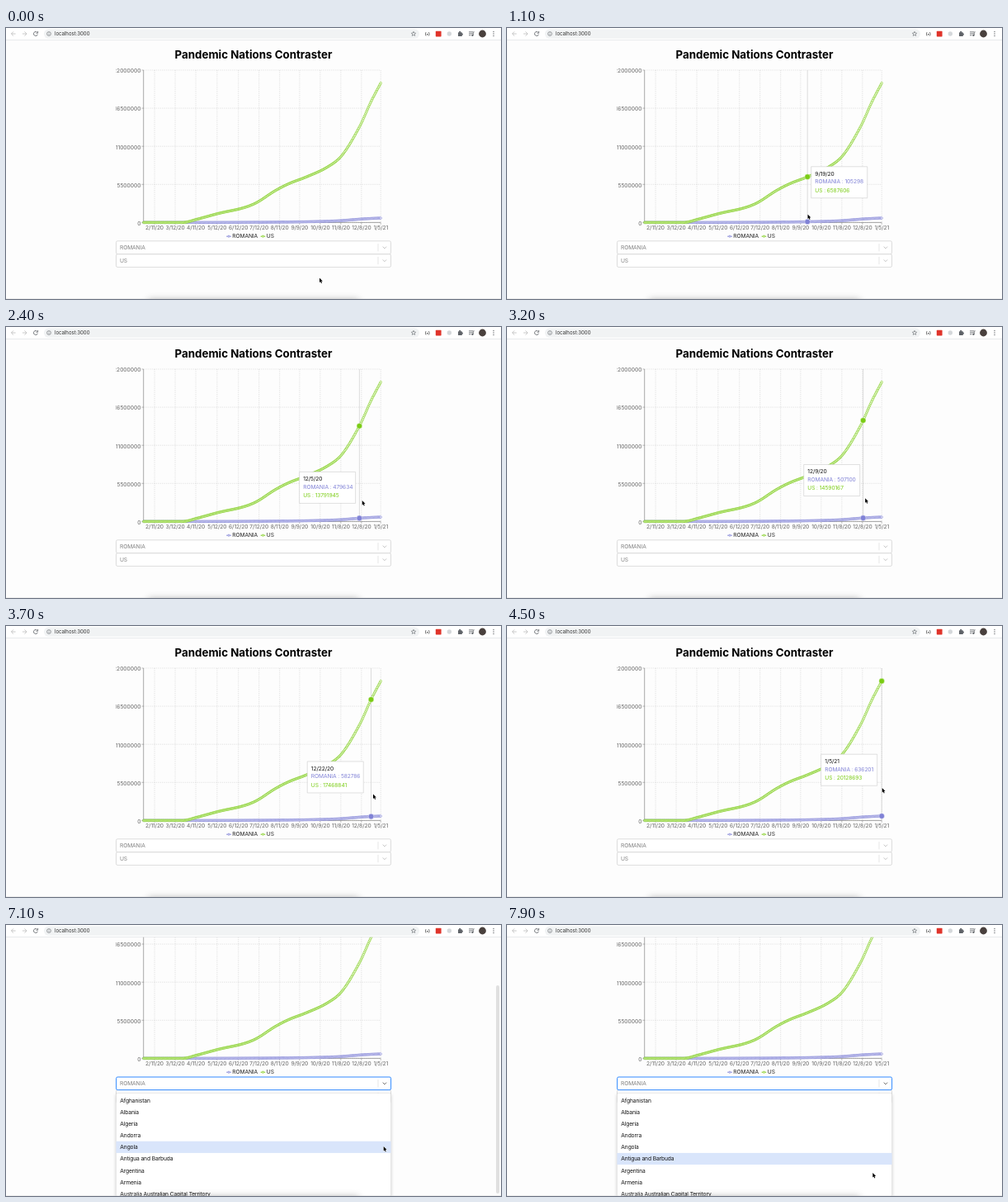
Animation, 600 px wide and 328 px high, one loop 8 s. Source, as an HTML page with a canvas:

```html
<!DOCTYPE html>
<html lang="en">
<head>
<meta charset="utf-8">
<title>Pandemic Nations Contraster</title>
<style>
html, body { margin: 0; width: 100%; height: 100%; overflow: hidden; background: #fdfdfd; }
canvas { display: block; width: 600px; height: 328px; }
</style>
</head>
<body>
<canvas id="stage"></canvas>
<script>
const W = 600, H = 328, LOOP = 8000, STEP = 100;
const U = 600 / 1440; // one page pixel on the stage
const FONT = 'Inter, "Liberation Sans", sans-serif';
const GREEN = '#7acc14', PURPLE = '#8082d6';
const canvas = document.getElementById('stage');
const ctx = canvas.getContext('2d');
const dpr = window.devicePixelRatio || 1;
canvas.width = W * dpr;
canvas.height = H * dpr;

const plot = { left: 166.7, right: 454.2, top: 51, bottom: 235.4 };
const DAYS = 345, MAX = 22e6, DAY_WIDTH = (plot.right - plot.left) / DAYS;
const dayX = day => plot.left + day * DAY_WIDTH;
const dayAt = x => Math.min(DAYS, Math.round((x - plot.left) / DAY_WIDTH));
const valueY = v => plot.bottom - v / MAX * (plot.bottom - plot.top);

// [day, total cases]
const US = [[0, 0], [58, 0], [79, 5e5], [110, 1.33e6], [145, 2.11e6], [165, 2.9e6], [191, 4.56e6],
  [212, 5.63e6], [237, 6587606], [267, 7.98e6], [289, 9.74e6], [314, 13791945], [331, 17468841], [345, 20128693]];
const ROMANIA = [[0, 0], [60, 0], [160, 27e3], [237, 105298], [283, 241e3], [314, 479634], [331, 582786], [345, 636201]];

const TICK_DAYS = [16, 46, 76, 107, 138, 168, 198, 227, 257, 287, 317, 345];
const OPTIONS = ['Afghanistan', 'Albania', 'Algeria', 'Andorra', 'Angola', 'Antigua and Barbuda',
  'Argentina', 'Armenia', 'Australia Australian Capital Territory'];

// time, pointer x, y
const POINTER = [[200, 380, 302.5], [600, 365, 212], [1000, 364, 207], [1100, 364.5, 225.5], [1900, 432, 217],
  [2200, 425, 219], [2400, 431.7, 210], [3100, 432, 208], [3700, 445, 203.5], [4200, 454.7, 196],
  [5400, 454.7, 196], [5600, 458, 228], [6000, 457.7, 268], [7700, 457.7, 268], [7900, 443.3, 300]];
const HOVER_START = 600, HOVER_END = 5500, CLICK = 6500;

function pointerAt(t) {
  const i = POINTER.findIndex(k => k[0] > t);
  if (i === 0) return POINTER[0].slice(1);
  if (i < 0) return POINTER[POINTER.length - 1].slice(1);
  const [t0, x0, y0] = POINTER[i - 1], [t1, x1, y1] = POINTER[i];
  const f = (t - t0) / (t1 - t0);
  return [x0 + (x1 - x0) * f, y0 + (y1 - y0) * f];
}

// Cubic curve through the data points
function casesAt(points, day) {
  const last = points.length - 1;
  let i = 0;
  while (i < last - 1 && points[i + 1][0] <= day) i++;
  const slope = n => {
    const a = points[Math.max(0, n - 1)], b = points[Math.min(last, n + 1)];
    return (b[1] - a[1]) / (b[0] - a[0]);
  };
  const [x0, y0] = points[i], [x1, y1] = points[i + 1];
  const w = x1 - x0, f = (day - x0) / w, g = 1 - f;
  const y = g * g * (1 + 2 * f) * y0 + f * f * (3 - 2 * f) * y1 + f * g * w * (g * slope(i) - f * slope(i + 1));
  return Math.max(0, Math.round(y));
}

function dateOf(day) {
  const d = new Date(Date.UTC(2020, 0, 26 + day));
  return `${d.getUTCMonth() + 1}/${d.getUTCDate()}/${d.getUTCFullYear() % 100}`;
}

function text(str, x, y, { size = 16 * U, color = '#666', align = 'left', weight = 400, spacing = -0.1 } = {}) {
  ctx.font = `${weight} ${size}px ${FONT}`;
  ctx.letterSpacing = spacing + 'px';
  ctx.fillStyle = color;
  ctx.textAlign = align;
  ctx.textBaseline = 'alphabetic';
  ctx.fillText(str, x, y + size * 0.364);
}

function line(points, color, width = U) {
  ctx.beginPath();
  points.forEach(([x, y]) => ctx.lineTo(x, y));
  ctx.strokeStyle = color;
  ctx.lineWidth = width;
  ctx.stroke();
}

function paint(fill, stroke, width) {
  if (fill) { ctx.fillStyle = fill; ctx.fill(); }
  if (stroke) { ctx.strokeStyle = stroke; ctx.lineWidth = width; ctx.stroke(); }
}

function disc(x, y, r, fill, stroke, width = U) {
  ctx.beginPath();
  ctx.arc(x, y, r, 0, Math.PI * 2);
  paint(fill, stroke, width);
}

function box(x, y, w, h, r, fill, stroke, width = U) {
  ctx.beginPath();
  ctx.roundRect(x, y, w, h, r);
  paint(fill, stroke, width);
}

function drawAxes() {
  const { left, right, top, bottom } = plot;
  const levels = [0, 1, 2, 3, 4].map(n => n * MAX / 4);
  ctx.setLineDash([3 * U, 3 * U]);
  levels.forEach(v => line([[left, valueY(v)], [right, valueY(v)]], '#bbb'));
  TICK_DAYS.forEach(d => line([[dayX(d), top], [dayX(d), bottom]], '#bbb'));
  ctx.setLineDash([]);
  line([[left, top], [left, bottom], [right, bottom]], '#555', 0.5);
  levels.forEach(v => {
    line([[left - 6 * U, valueY(v)], [left, valueY(v)]], '#666');
    text(String(v), left - 8 * U, valueY(v) + 0.9, { align: 'right', spacing: 0 });
  });
  TICK_DAYS.forEach(d => {
    line([[dayX(d), bottom], [dayX(d), bottom + 6 * U]], '#666');
    text(dateOf(d), dayX(d), bottom + 5.8, { align: 'center' });
  });
}

function drawSeries(points, color) {
  const dots = Array.from({ length: DAYS + 1 }, (_, d) => [dayX(d), valueY(casesAt(points, d))]);
  line(dots, color);
  dots.forEach(([x, y]) => disc(x, y, 3 * U, '#fff', color, 0.62));
}

function drawLegend() {
  [[267, 'ROMANIA', PURPLE], [308.5, 'US', GREEN]].forEach(([x, name, color]) => {
    line([[x, 252.2], [x + 6, 252.2]], color, 0.8);
    disc(x + 3, 252.2, 1.1, '#fff', color, 0.8);
    text(name, x + 7.3, 252, { color: '#222' });
  });
}

const TIP = { w: 68, h: 38, gap: 10 * U };

// The tooltip sits right of and below the pointer, and flips where it would leave the plot
function tipTarget(t) {
  const [x, y] = pointerAt(Math.max(t, HOVER_START));
  const { w, h, gap } = TIP;
  return [x + gap + w > plot.right ? x - gap - w : x + gap, y + gap + h > plot.bottom ? y - gap - h : y + gap];
}

// It trails its target by averaging the last half second
function tipPosition(t) {
  const samples = Array.from({ length: 11 }, (_, i) => tipTarget(t - i * 50));
  return [0, 1].map(axis => samples.reduce((sum, p) => sum + p[axis], 0) / samples.length);
}

function drawHover(t) {
  const lagged = t - STEP;
  const day = dayAt(pointerAt(lagged)[0]), ax = dayX(day);
  const [x, y] = tipPosition(lagged);
  const romania = casesAt(ROMANIA, day), us = casesAt(US, day);
  line([[ax, plot.top], [ax, plot.bottom]], '#bbb', 0.5);
  disc(ax, valueY(romania), 8 * U, PURPLE, '#fff');
  disc(ax, valueY(us), 8 * U, GREEN, '#fff');
  box(x, y, TIP.w, TIP.h, 0, '#fff', '#ccc', 0.6);
  text(dateOf(day), x + 4.6, y + 8.4, { color: '#111' });
  text('ROMANIA : ' + romania, x + 4.6, y + 18, { color: PURPLE });
  text('US : ' + us, x + 4.6, y + 28.4, { color: GREEN });
}

function drawSelect(y, label, { hover = false, focus = false } = {}) {
  const h = 38 * U, mid = y + h / 2;
  if (focus) box(133.6, y + 0.2, 333, h - 0.2, 1.7, '#fff', '#2684ff', 0.95);
  else box(133.5, y, 333, h, 1.7, '#fff', hover ? '#999' : '#bbb', 0.5);
  text(label, 138, mid, { color: '#808080' });
  line([[451, y + 3.3], [451, y + h - 3.3]], '#ccc', 0.5);
  line([[456.7, mid - 1.1], [458.9, mid + 1.2], [461.1, mid - 1.1]], focus ? '#555' : hover ? '#777' : '#bbb', 0.85);
}

function drawMenu(top, active) {
  ctx.save();
  ctx.shadowColor = 'rgba(0,0,0,0.2)';
  ctx.shadowBlur = 4 * dpr;
  ctx.shadowOffsetY = 1.5 * dpr;
  box(133.4, top, 333.2, 125, 1.7, '#fff');
  ctx.restore();
  box(133.4, top, 333.2, 125, 1.7, null, 'rgba(0,0,0,0.12)', 0.5);
  OPTIONS.forEach((name, i) => {
    const y = top + 4 * U + i * 34 * U;
    if (i === active) {
      ctx.fillStyle = '#d9e5fb';
      ctx.fillRect(133.4, y, 333.2, 34 * U);
    }
    text(name, 138.3, y + 17 * U, { color: '#111' });
  });
}

function drawPage(t) {
  const open = t >= CLICK;
  const scroll = open ? Math.min(74, 42 + (t - CLICK) * 0.32) : 0;
  ctx.save();
  ctx.translate(0, -scroll);
  text('Pandemic Nations Contraster', 300, 32.6, { size: 32 * U, weight: 700, color: '#000', align: 'center', spacing: 0 });
  ctx.save();
  ctx.beginPath();
  ctx.rect(133.3, 40, 333.4, 217);
  ctx.clip();
  drawAxes();
  drawSeries(ROMANIA, PURPLE);
  drawSeries(US, GREEN);
  drawLegend();
  if (t >= HOVER_START && t < HOVER_END) drawHover(t);
  ctx.restore();
  drawSelect(273.6, 'US');
  drawSelect(257.8, 'ROMANIA', { hover: t >= 6000, focus: open });
  if (open) {
    const caretOn = Math.floor((t - 6400) / 500) % 2 === 0;
    if (caretOn) line([[138, 262], [138, 269.8]], '#222', 0.5);
    drawMenu(277.4, t < 6600 ? 0 : t < 7800 ? 4 : 5);
  }
  ctx.restore();
  if (open) {
    const alpha = Math.min(1, Math.max(0, (7200 - t) / 400));
    box(594, 73, 4, 252, 2, `rgba(0,0,0,${0.45 * alpha})`);
  }
}

function drawDockShadow() {
  ctx.save();
  ctx.shadowColor = 'rgba(0,0,0,0.28)';
  ctx.shadowBlur = 9 * dpr;
  box(172, H + 0.5, 256, 20, 3, '#000');
  ctx.restore();
  line([[0, 327.8], [W, 327.8]], '#ccc', 0.5);
}

function drawArrow(x, dir, color) {
  line([[x - 2.6 * dir, 7], [x + 2.6 * dir, 7]], color, 0.8);
  line([[x, 4.4], [x + 2.6 * dir, 7], [x, 9.6]], color, 0.8);
}

function drawToolbar() {
  const dark = '#5f6368';
  ctx.fillStyle = '#fff';
  ctx.fillRect(0, 0, W, 14.5);
  line([[0, 14.6], [W, 14.6]], '#dadce0', 0.6);
  drawArrow(9, -1, '#bbb');
  drawArrow(22.5, 1, '#bbb');
  ctx.beginPath();
  ctx.arc(36, 7, 2.5, 0.3, 5.5);
  paint(null, dark, 0.85);
  line([[38.6, 3.9], [38.6, 6.2], [36.4, 6.2]], dark, 0.8);

  box(46, 1.4, 455, 11.4, 5.7, '#f1f3f4');
  disc(52, 7, 2.4, null, dark, 0.6);
  line([[52, 6.7], [52, 8.4]], dark, 0.6);
  line([[52, 5.4], [52, 6]], dark, 0.6);
  text('localhost:3000', 59, 7, { size: 6, color: '#333', spacing: 0 });
  const star = Array.from({ length: 11 }, (_, i) => {
    const a = i * Math.PI / 5 - Math.PI / 2, r = i % 2 ? 1.3 : 2.8;
    return [494 + r * Math.cos(a), 7.1 + r * Math.sin(a)];
  });
  line(star, dark, 0.6);

  text('(•)', 510.7, 7, { size: 5, color: '#333', align: 'center', weight: 600 });
  box(520.8, 3.8, 6.8, 6.6, 0.6, '#e0342b');
  disc(537.3, 7, 2.7, '#d5d8db');
  box(548, 5.3, 4.8, 4.8, 0.5, dark);
  disc(550.2, 4.8, 1.1, dark);
  disc(552.9, 7.6, 1.1, dark);
  [[4.8, 566], [6.8, 566], [8.8, 563.5]].forEach(([y, end]) => line([[561, y], [end, y]], dark, 0.8));
  line([[567.8, 4.8], [566.4, 4.8], [566.4, 8.8]], dark, 0.7);
  disc(565.4, 8.9, 1.1, dark);
  disc(562 + 0.4, 7, 4.4, null);
  disc(562.4 + 0, 7, 0, null);
  disc(577.5 - 0, 7, 4.4, '#49403d');
  [4.5, 7, 9.5].forEach(y => disc(591, y, 0.65, dark));
}

function drawPointer(t) {
  ctx.save();
  ctx.translate(...pointerAt(t));
  ctx.scale(0.92, 0.92);
  ctx.beginPath();
  [[0, 0], [0, 6], [1.35, 4.8], [2.3, 7], [3.3, 6.6], [2.4, 4.4], [4.2, 4.3]].forEach(p => ctx.lineTo(...p));
  ctx.closePath();
  ctx.lineJoin = 'round';
  paint(null, '#fff', 1);
  paint('#000');
  ctx.restore();
}

function draw(now) {
  const t = Math.floor(now % LOOP / STEP) * STEP;
  ctx.setTransform(dpr, 0, 0, dpr, 0, 0);
  ctx.fillStyle = '#fdfdfd';
  ctx.fillRect(0, 0, W, H);
  drawPage(t);
  drawDockShadow();
  drawToolbar();
  drawPointer(t);
}

const start = performance.now();
function tick() {
  draw(performance.now() - start);
  requestAnimationFrame(tick);
}
tick();
</script>
</body>
</html>
```
